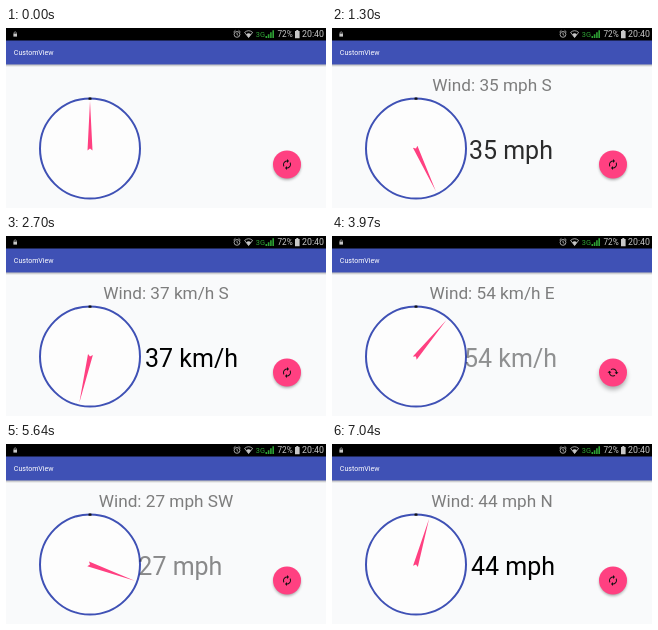
Write an HTML page that moves like this. It is 320x180 px and loops after 8000 ms.

```html
<!DOCTYPE html>
<html lang="en">
<head>
<meta charset="utf-8">
<title>CustomView</title>
<style>
html, body { margin: 0; width: 100%; height: 100%; overflow: hidden; background: #f9fafb; }
svg { display: block; width: 100vw; height: 100vh; }
text { font-family: Roboto, "Open Sans", sans-serif; }
</style>
</head>
<body>
<svg viewBox="0 0 320 180">
  <defs>
    <filter id="soft" x="-50%" y="-50%" width="200%" height="200%">
      <feGaussianBlur id="blur" stdDeviation="1.6"/>
    </filter>
    <linearGradient id="barShade" x2="0" y2="1">
      <stop offset="0" stop-color="#000" stop-opacity=".28"/>
      <stop offset="1" stop-color="#000" stop-opacity="0"/>
    </linearGradient>
    <clipPath id="fabClip"><circle cx="281" cy="136.5" r="14"/></clipPath>
  </defs>
  <rect width="320" height="180" fill="#f9fafb"/>

  <!-- status bar -->
  <rect width="320" height="13" fill="#000"/>
  <g fill="#c8c8c8">
    <rect x="7.4" y="5.6" width="3.6" height="3" />
    <path d="M8.1 5.8V4.9a1.1 1.1 0 0 1 2.2 0v.9" fill="none" stroke="#c8c8c8" stroke-width=".6"/>
    <g fill="none" stroke="#c8c8c8" stroke-width=".8">
      <circle cx="231" cy="6.4" r="2.9"/>
      <path d="M231 4.7v1.9l1.3.8M227.5 4l1.9-1.6M234.5 4l-1.9-1.6"/>
      <path d="M238.6 4.4Q242.6 1 246.6 4.4L242.6 9.6Z"/>
    </g>
    <path d="M240.2 6.3Q242.6 4.4 245 6.3L242.6 9.6Z"/>
    <text x="271.5" y="9.3" font-size="8.2">72%</text>
    <path d="M289 3h1.3V2h2v1h1.3v7.2H289z"/>
    <text x="296" y="9.3" font-size="8.8">20:40</text>
  </g>
  <g fill="#2fa335">
    <text x="249.8" y="9" font-size="7.4">3G</text>
    <path d="M259.5 8h1.6v2h-1.6zM261.8 6.2h1.6V10h-1.6zM264.1 4.3h1.6V10h-1.6zM266.4 2.3h1.6V10h-1.6z"/>
  </g>

  <!-- toolbar -->
  <rect y="12.5" width="320" height="24" fill="#3f51b5"/>
  <rect y="36.5" width="320" height="2.5" fill="url(#barShade)"/>
  <text x="7.8" y="27.3" font-size="7.05" fill="#fff">CustomView</text>

  <text id="title" x="160" y="62.8" font-size="17.2" fill="#7d7d7d" text-anchor="middle"></text>

  <!-- dial -->
  <circle cx="84" cy="120.5" r="50" fill="#fdfdfd" stroke="#3f51b5" stroke-width="2"/>
  <rect x="82.5" y="69.4" width="3" height="2.3" rx=".5" fill="#111"/>
  <path id="needle" d="M0-47.5L2.5 2L0 0L-2.5 2Z" fill="#ff4081"/>
  <text id="speed" y="131" font-size="25" fill="#000"></text>

  <!-- button -->
  <circle id="shade" cx="281" cy="138.5" r="13.5" fill="#000" filter="url(#soft)"/>
  <circle cx="281" cy="136.5" r="14" fill="#ff4081"/>
  <circle id="ripple" cx="278.5" cy="139.5" fill="#000" clip-path="url(#fabClip)"/>
  <path id="icon" fill="#111" d="M12 6v3l4-4-4-4v3c-4.42 0-8 3.58-8 8 0 1.57.46 3.03 1.24 4.26L6.7 14.8c-.45-.83-.7-1.79-.7-2.8 0-3.31 2.69-6 6-6zm6.76 1.74L17.3 9.2c.44.84.7 1.79.7 2.8 0 3.31-2.69 6-6 6v-3l-4 4 4 4v-3c4.42 0 8-3.58 8-8 0-1.57-.46-3.03-1.24-4.26z"/>
</svg>
<script>
const LOOP = 8000, TICK = 200 / 3, MS_PER_DEG = 2.65, SLIDE = 12;
const readings = [
  { press: 490, start: 889, angle: 188, speed: '35 mph', dir: 'S' },
  { press: 1890, start: 2185, angle: 193, speed: '37 km/h', dir: 'S' },
  { press: 3560, start: 3861, angle: 95, speed: '54 km/h', dir: 'E' },
  { press: 5030, start: 5342, angle: 247, speed: '27 mph', dir: 'SW' },
  { press: 6490, start: 6735, angle: 16, speed: '44 mph', dir: 'N' }
];
const el = id => document.getElementById(id);
const [title, needle, speed, shade, blur, ripple, icon] =
  ['title', 'needle', 'speed', 'shade', 'blur', 'ripple', 'icon'].map(el);
const ramp = (t, from, to) => Math.min(1, Math.max(0, (t - from) / (to - from)));
const set = (node, attrs) => {
  for (const name in attrs) node.setAttribute(name, attrs[name]);
};

function drawReading(t) {
  const now = readings.filter(r => t >= r.start - 50).pop();
  const p = now ? ramp(t, now.start, now.start + now.angle * MS_PER_DEG) : 0;
  title.textContent = now ? `Wind: ${now.speed} ${now.dir}` : '';
  speed.textContent = now ? now.speed : '';
  set(speed, { x: 139 - SLIDE * (1 - p), opacity: p });
  set(needle, { transform: `translate(84 120.5) rotate(${now ? now.angle * p : 0})` });
}

function drawButton(t) {
  const r = readings.filter(r => t >= r.press).pop();
  let lift = 0, turn = 0, grow = 0, dark = 0;
  if (r) {
    lift = ramp(t, r.press + 100, r.start - 50) * (1 - ramp(t, r.start + 20, r.start + 220));
    turn = 180 * ramp(t, r.start - 40, r.start + 260);
    grow = ramp(t, r.press + 120, r.press + 240);
    dark = (0.06 + 0.08 * grow) * (1 - ramp(t, r.start - 15, r.start + 10));
  }
  set(shade, { cy: 138.2 + 3 * lift, opacity: 0.36 - 0.06 * lift });
  set(blur, { stdDeviation: 1.6 + 1.4 * lift });
  set(ripple, { r: 7.5 + 12 * grow, opacity: dark });
  set(icon, { transform: `translate(281 136.5) rotate(${turn}) scale(.5) translate(-12 -12)` });
}

function frame() {
  const t = performance.now() % LOOP;
  const held = Math.floor((t - 33) / TICK) * TICK + 33.4;
  drawReading(held);
  drawButton(held);
  requestAnimationFrame(frame);
}
frame();
</script>
</body>
</html>
```
